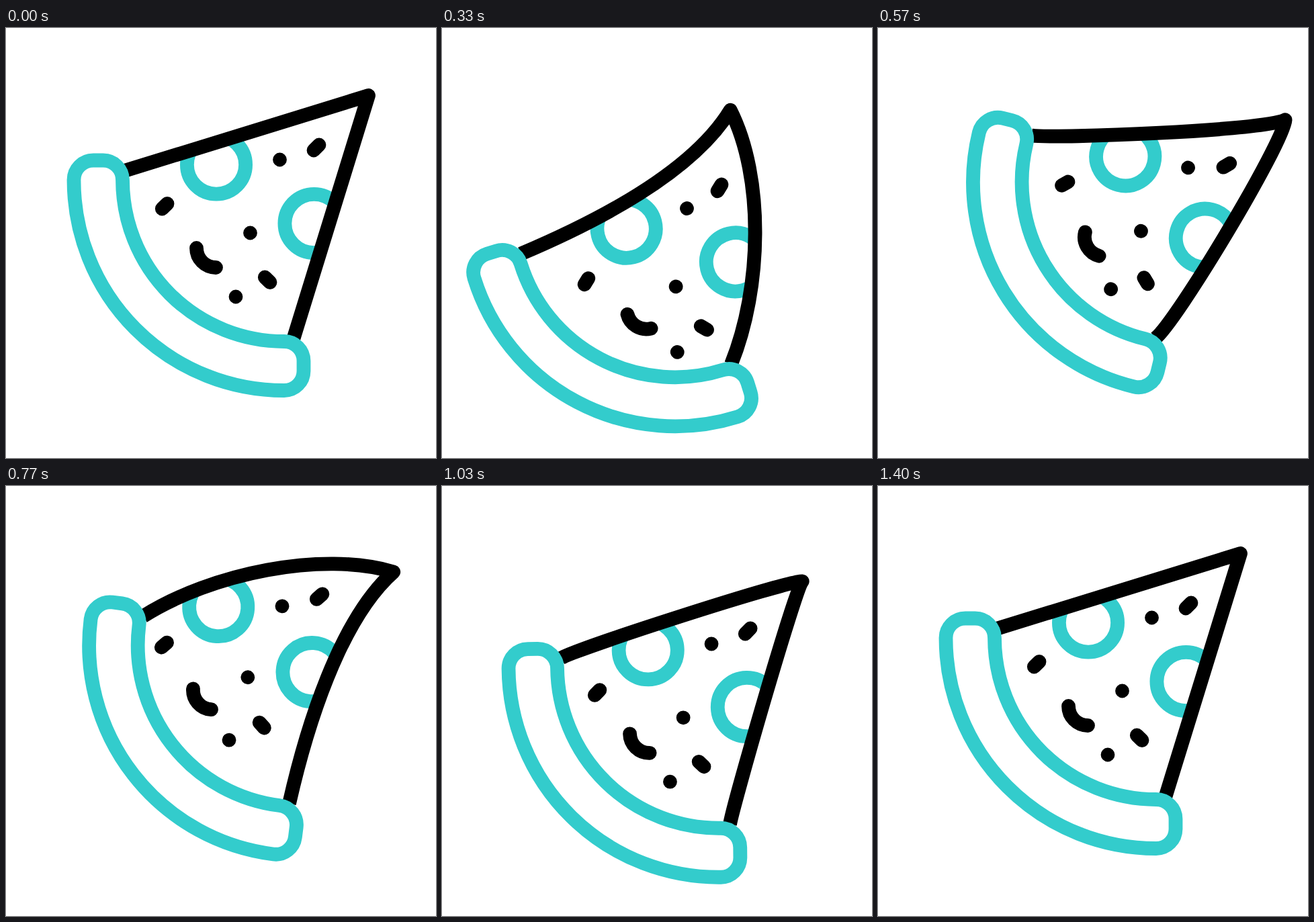
Animation, 640 px wide and 640 px high, one loop 2000 ms. Source, as an HTML page:

```html
<!DOCTYPE html>
<html lang="en">
<head>
<meta charset="utf-8">
<title>Pizza slice</title>
<style>
  html, body { margin: 0; height: 100%; overflow: hidden; background: #fff; }
  svg { display: block; width: 100%; height: 100%; }
  path, circle { fill: none; stroke: #000; stroke-width: 20.8; stroke-linejoin: round; }
  .teal { stroke: #33cccc; }
  .bits { stroke-linecap: round; }
</style>
</head>
<body>
<svg viewBox="0 0 640 640">
  <clipPath id="inside"><path id="area"/></clipPath>
  <g id="slice">
    <g clip-path="url(#inside)">
      <g id="toppings">
        <circle class="teal" cx="313" cy="203.5" r="43.6"/>
        <circle class="teal" cx="458.5" cy="291" r="43.6"/>
        <path class="bits" d="M407.5 196h0M363.5 305h0M342 400h0
          M458 182l8-8M232.3 269l7.7-7.5M385.3 371l7.7 7.5M283.5 327.5a29 29 0 0 0 29 29"/>
      </g>
    </g>
    <path id="edges"/>
    <path class="teal" d="M101 226a29 29 0 0 1 29-29h14.5a29 29 0 0 1 29 29
      A240.5 240.5 0 0 0 414 466.5a29 29 0 0 1 29 29v15a29 29 0 0 1-29 29A313 313 0 0 1 101 226z"/>
  </g>
</svg>
<script>
const $ = id => document.getElementById(id);
const LOOP = 2000;

// [frame, value] pairs, eased in and out between neighbours
const TILT = [[0.6, 0], [8.2, -20], [19.2, 17.5], [27.2, -5], [34.3, 3], [42, 0]];
const DROP = [[0.6, 0], [8.7, 110], [19.6, -75], [27, 62], [38.5, 0]];
const BEND = [[0.6, 0], [12.3, 1.12], [23.5, -1], [33.5, 0]];

const TIP = [539.5, 100.5], LEFT = [178, 212], RIGHT = [428, 462];

// 30 frames per second, with frame starts rounded to 10 ms
const frameAt = ms => Math.floor(Math.floor(ms / 10) * 0.3 + 0.15);

function tween(keys, f) {
  const i = keys.findIndex(k => k[0] > f);
  if (i < 0) return keys[keys.length - 1][1];
  if (i === 0) return keys[0][1];
  const [[f0, a], [f1, b]] = [keys[i - 1], keys[i]];
  const x = (f - f0) / (f1 - f0);
  return a + (b - a) * x * x * (3 - 2 * x);
}

// Bezier handles of one side: at the crust and at the tip
function handles(base, bend, convex) {
  const dx = TIP[0] - base[0], dy = TIP[1] - base[1], len = Math.hypot(dx, dy);
  const ex = dx / len, ey = dy / len;
  const at = ([x, y], along, side) => [
    x + Math.abs(bend) * along * ex - bend * side * ey,
    y + Math.abs(bend) * along * ey + bend * side * ex];
  return [at(base, 113, convex ? 46 : 23), at(TIP, -100, convex ? 50 : 45)];
}

function draw(now) {
  const f = frameAt(now % LOOP);
  const bend = tween(BEND, f);
  const [l1, l2] = handles(LEFT, bend, bend < 0);
  const [r1, r2] = handles(RIGHT, bend, bend > 0);
  const d = `M${LEFT}C${l1} ${l2} ${TIP}C${r2} ${r1} ${RIGHT}`;
  $('edges').setAttribute('d', d);
  $('area').setAttribute('d', d + 'L300 540L100 340z');

  const shift = 23.5 * bend;
  $('toppings').setAttribute('transform',
    `translate(${shift} ${shift}) rotate(${3.3 * bend} 386 247)`);
  $('slice').setAttribute('transform',
    `translate(0 ${tween(DROP, f)}) rotate(${tween(TILT, f)} 218 422)`);
  requestAnimationFrame(draw);
}
requestAnimationFrame(draw);
</script>
</body>
</html>
```
